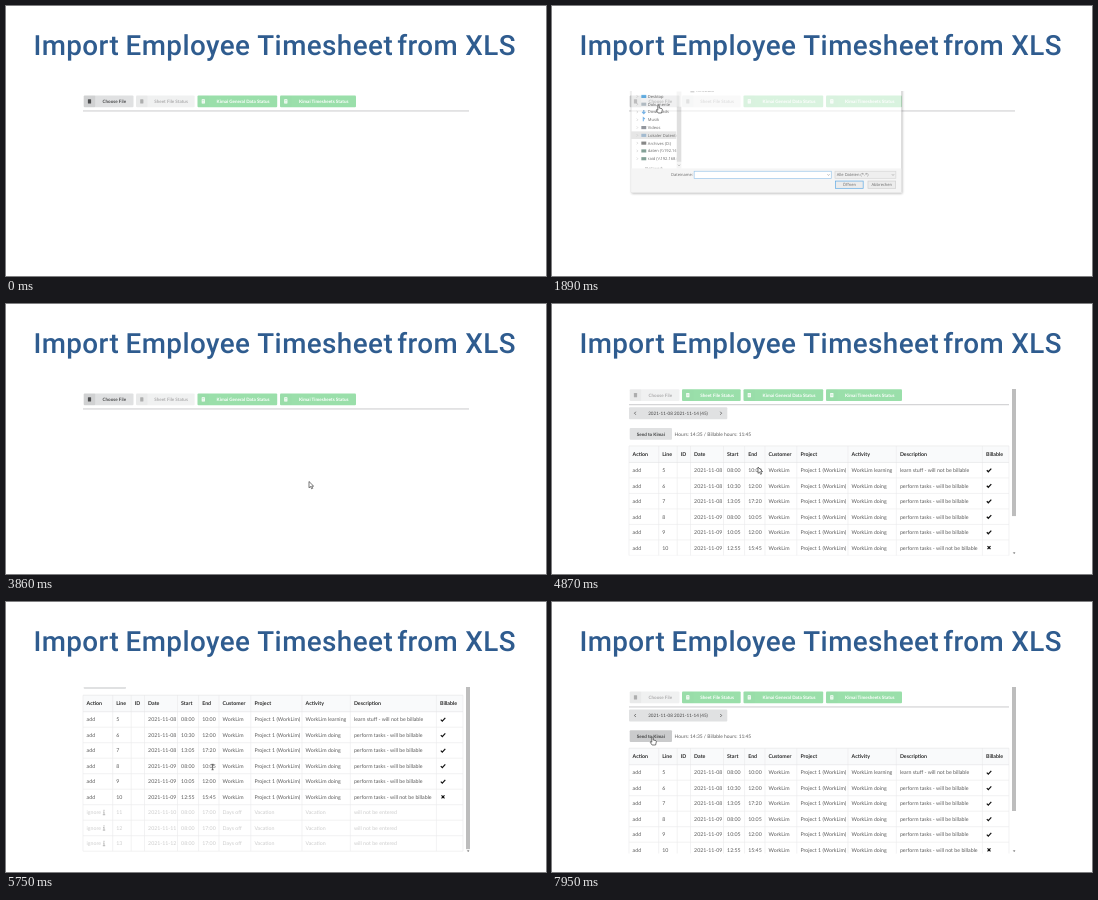
Recreate the animation shown at these times as an HTML page. Size 540 px wide and 270 px high, loop 8000 ms.

```html
<!DOCTYPE html>
<html lang="en">
<head>
<meta charset="utf-8">
<title>Import Employee Timesheet</title>
<style>
  html, body { margin: 0; width: 100%; height: 100%; overflow: hidden; background: #fff; }
  svg { display: block; width: 100vw; height: 100vh; }
  text { white-space: pre; text-rendering: geometricPrecision; }
  .title { font: 500 27.8px Roboto, sans-serif; letter-spacing: .42px; fill: #2f5c8f; }
  .cell { font: 5.25px Lato, sans-serif; fill: #5a5a5a; }
  .head { font: 700 5.25px Lato, sans-serif; fill: #2a2a2a; }
  .week { font-size: 4.6px; fill: #444; text-anchor: middle; }
  .hours { font-size: 4.9px; }
  .button { font: 700 4.55px Lato, sans-serif; text-anchor: middle; }
  .win { font: 4.15px "Open Sans", sans-serif; fill: #111; }
</style>
</head>
<body>
<svg id="stage" viewBox="0 0 540 270" xmlns="http://www.w3.org/2000/svg">
  <defs>
    <clipPath id="view"><rect x="74" y="85" width="391" height="166.5"/></clipPath>
    <clipPath id="side"><rect x="76.5" y="85" width="46.3" height="78.5"/></clipPath>
    <filter id="shadow" x="-10%" y="-10%" width="120%" height="120%">
      <feDropShadow dx="0.8" dy="1" stdDeviation="1.2" flood-opacity=".4"/>
    </filter>
  </defs>
</svg>
<script>
const LOOP = 8000, SCROLL_MAX = 53;
const stage = document.getElementById('stage');

function add(parent, tag, attrs = {}, content) {
  const node = document.createElementNS('http://www.w3.org/2000/svg', tag);
  for (const key in attrs) node.setAttribute(key, attrs[key]);
  if (content !== undefined) node.textContent = content;
  parent.append(node);
  return node;
}
const group = (parent, attrs) => add(parent, 'g', attrs);
const rect = (parent, x, y, width, height, fill, extra) =>
  add(parent, 'rect', { x, y, width, height, fill, ...extra });
const text = (parent, cls, x, y, content, extra) =>
  add(parent, 'text', { class: cls, x, y, ...extra }, content);
const path = (parent, d, stroke, width, extra) =>
  add(parent, 'path', { d, stroke, 'stroke-width': width, fill: 'none', ...extra });
const show = (node, visible) => node.setAttribute('visibility', visible ? 'visible' : 'hidden');
const fade = (node, amount) => node.setAttribute('opacity', amount);

const ramp = (t, from, to) => Math.min(1, Math.max(0, (t - from) / (to - from)));
const ease = u => u * u * (3 - 2 * u);

[['Import', 27.4], ['Employee', 119.6], ['Timesheet', 251.3], ['from', 391.2], ['XLS', 459.2]]
  .forEach(([word, x]) => text(stage, 'title', x, 48.8, word));

const view = group(stage, { 'clip-path': 'url(#view)' });
const page = group(view);

// Labelled button with a darker icon strip on its left
function statusButton(x, width, label, green, opacity) {
  const g = group(page, { opacity });
  const ink = green ? '#fff' : '#4c4d4e';
  const face = rect(g, x, 89.4, width, 11.8, green ? '#21ba45' : '#e0e1e2', { rx: 1 });
  rect(g, x, 89.4, 11.5, 11.8, '#000', { rx: 1, opacity: green ? .03 : .07 });
  rect(g, x + 4.2, 93.2, 3.2, 4.2, ink, { rx: .5 });
  if (green) path(g, `M${x + 4.8} 94.5h2m-2 1.5h2`, '#21ba45', .5);
  text(g, 'button', x + (width + 11.5) / 2, 96.9, label, { fill: ink });
  return { g, face };
}
const choose = statusButton(77.7, 49.8, 'Choose File', false, 1);
const sheetIdle = statusButton(130, 58.7, 'Sheet File Status', false, .45);
const sheetReady = statusButton(130, 58.7, 'Sheet File Status', true, .45);
statusButton(191.5, 79.7, 'Kimai General Data Status', true, .45);
statusButton(274, 76, 'Kimai Timesheets Status', true, .45);
const divider = rect(page, 77, 104.4, 386, 1.1, '#cfcfd1');

// Imported data
const data = group(page);
rect(data, 77, 107.6, 98.3, 12, '#e0e1e2', { rx: 1 });
path(data, 'M83.8 112l-1.3 1.5l1.3 1.5M168.3 112l1.3 1.5l-1.3 1.5', '#444', .7);
text(data, 'cell week', 126, 115.2, '2021-11-08 2021-11-14 (45)');
const send = rect(data, 77.7, 128.2, 42.3, 11.8, '#e0e1e2', { rx: 1 });
text(data, 'button', 98.8, 135.8, 'Send to Kimai', { fill: '#3f4041' });
text(data, 'cell hours', 122.5, 136, 'Hours: 14:35 / Billable hours: 11:45');

const TOP = 146.2, HEAD = 16.5, ROW = 15.5;
const columns = [77, 106.7, 125.2, 138.5, 171.5, 192.6, 213, 244.8, 296, 344.3, 430.4];
const heads = ['Action', 'Line', 'ID', 'Date', 'Start', 'End', 'Customer', 'Project', 'Activity', 'Description', 'Billable'];
const brand = 'WorkLim';
const work = (line, day, start, end, activity, note) =>
  ['add', line, '', '2021-11-' + day, start, end, brand, `Project 1 (${brand})`, `${brand} ${activity}`, note];
const off = (line, day) =>
  ['ignore', line, '', '2021-11-' + day, '08:00', '17:00', 'Days off', 'Vacation', 'Vacation', 'will not be entered'];
const rows = [
  work(5, '08', '08:00', '10:00', 'learning', 'learn stuff - will not be billable'),
  work(6, '08', '10:30', '12:00', 'doing', 'perform tasks - will be billable'),
  work(7, '08', '13:05', '17:20', 'doing', 'perform tasks - will be billable'),
  work(8, '09', '08:00', '10:05', 'doing', 'perform tasks - will be billable'),
  work(9, '09', '10:05', '12:00', 'doing', 'perform tasks - will be billable'),
  work(10, '09', '12:55', '15:45', 'doing', 'perform tasks - will not be billable'),
  off(11, 10), off(12, 11), off(13, 12)
];
const bottom = TOP + HEAD + ROW * rows.length;
rect(data, 77, TOP, 380, HEAD, '#f9fafb');
columns.concat(457).forEach(x => path(data, `M${x} ${TOP}V${bottom}`, '#e9eaeb', .6));
path(data, `M77 ${TOP}H457M77 ${TOP + HEAD}H457`, '#e2e3e4', .6);
heads.forEach((name, i) => text(data, 'head', columns[i] + 3.6, TOP + 10, name));
rows.forEach((row, r) => {
  const mid = TOP + HEAD + ROW * (r + .5);
  const ignored = r > 5;
  const g = group(data, { opacity: ignored ? .3 : 1 });
  path(data, `M77 ${mid + ROW / 2}H457`, '#e9eaeb', .6);
  row.forEach((value, i) => text(g, 'cell', columns[i] + 3.6, mid + 1.9, value));
  if (ignored) path(g, `M98 ${mid - 2.6}v1.2m-1 1h1v2.6m-1.2 0h2.4`, '#333', 1.1);
  else if (r < 5) path(g, `M434.8 ${mid + .1}l1.5 1.5l3-3.2`, '#111', 1.2);
  else path(g, `M435.5 ${mid - 1.5}l3 3m0-3l-3 3`, '#111', 1.2);
});

const scroller = group(view);
const thumb = rect(scroller, 460, 85, 4, 124, '#bdbdbd');
path(scroller, 'M461.3 248.6h1.8l-.9 1.2z', '#777', .4, { fill: '#777' });

// File chooser
const dialog = group(view);
rect(dialog, 76.5, 40, 275.5, 148, '#fff', { filter: 'url(#shadow)', stroke: '#aaa', 'stroke-width': .5 });
const tree = group(dialog, { 'clip-path': 'url(#side)' });
rect(tree, 76.5, 125.6, 46.5, 7.8, '#d9d9d9');
const chevrons = group(tree);
const drives = [['Desktop', '#1e90e0'], ['Dokumente', '#9aa9b5'], ['Downloads'], ['Musik'], ['Videos', '#555b66'],
  ['Lokaler Datenträger', '#6f94b5'], ['Archives (D:)', '#444'],
  ['daten (\\\\192.168.0', '#3c6b5c'], ['raid (\\\\192.168.0.', '#3c6b5c']];
drives.forEach(([name, color], i) => {
  const y = 90 + i * 7.93;
  path(chevrons, `M82.3 ${y - 1.2}l1.1 1.2l-1.1 1.2`, '#999', .5);
  if (color) rect(tree, 87, y - 1.6, 5, 3.2, color);
  else if (name === 'Musik') path(tree, `M89 ${y + 1.5}v-3.7l1.6 1.4`, '#2b88d8', 1.1);
  else path(tree, `M89.5 ${y - 2}v3.5m-1.7-1.6l1.7 1.8l1.7-1.8`, '#2b88d8', 1.2);
  text(tree, 'win', 93.6, y + 1.5, name);
});
text(tree, 'win', 91, 165, 'Netzwerk');
rect(dialog, 123, 85, 4.8, 78.5, '#f0f0f0');
rect(dialog, 123.2, 100.5, 4.4, 56, '#cdcdcd');
path(dialog, 'M124.3 159.5l1.1 1.2l1.1-1.2', '#555', .6);
rect(dialog, 137, 82.5, 4, 3.4, '#bbb');
text(dialog, 'win', 143, 85.5, 'timeData', { opacity: .6 });
rect(dialog, 76.7, 163.3, 275.1, 24.5, '#f0f0f0');
text(dialog, 'win', 139.6, 171.4, 'Dateiname:', { 'text-anchor': 'end' });

function field(x, y, width, height, fill, stroke) {
  return rect(dialog, x, y, width, height, fill, { stroke, 'stroke-width': .7 });
}
field(140.8, 166.2, 139.7, 7.4, '#fff', '#5fa5df');
const fileName = text(dialog, 'win', 142.2, 171.4, brand + '_timeData.xlsx');
field(284.3, 166.2, 62, 7.2, '#e6e6e6', '#c0c0c0');
text(dialog, 'win', 286, 171.4, 'Alle Dateien (*.*)');
path(dialog, 'M276.6 169.3l1.1 1.2l1.1-1.2M342.3 169.3l1.1 1.2l1.1-1.2', '#555', .6);
const open = field(284.8, 176.2, 28.2, 7.4, '#e1e1e1', '#0078d7');
text(dialog, 'win', 298.9, 181.4, 'Öffnen', { 'text-anchor': 'middle' });
field(317.9, 176.2, 28.2, 7.4, '#e1e1e1', '#b5b5b5');
text(dialog, 'win', 332, 181.4, 'Abbrechen', { 'text-anchor': 'middle' });

// Pointer shapes share one moving group
const pointer = group(view);
const solid = { fill: '#fff', 'stroke-linejoin': 'round' };
const arrow = path(pointer, 'M0 0V6.3L1.5 5L2.6 7.3L3.7 6.8L2.7 4.6H4.6Z', '#222', .6, solid);
const hand = path(pointer, 'M-.7 .7Q0-.3 .7 .7V3L3.3 3.6Q4 4 3.8 5L3.1 8H-.4L-2.4 5.2Q-2.2 4.2-.7 5.2Z', '#222', .6, solid);
const beam = path(pointer, 'M0 .3h2.2M1.1 .3v5.4M0 5.7h2.2', '#222', .6);

const route = [
  [250, 420, 252], [1010, 106.5, 99], [1950, 106.5, 99], [2450, 150, 76],
  [2800, 150, 76], [3380, 325, 176], [3580, 303, 177.5], [3860, 303, 177.5],
  [4000, 284, 177.5], [4300, 284, 177.5], [4600, 206, 163.3], [5730, 206, 161.5],
  [6050, 165, 205], [6370, 84, 212], [6950, 84, 212], [7220, 111, 195],
  [7540, 111, 195], [7740, 100.5, 135], [LOOP, 100.5, 135]
];
function pointerAt(t) {
  const i = Math.max(1, route.findIndex(stop => stop[0] >= t));
  const [t0, x0, y0] = route[i - 1], [t1, x1, y1] = route[i];
  const u = ease(ramp(t, t0, t1));
  return [x0 + (x1 - x0) * u, y0 + (y1 - y0) * u];
}
const grey = u => `rgb(${[224, 225, 226].map(c => Math.round(c - 22 * u))})`;

function render(t) {
  const loaded = t >= 3930;
  const scroll = SCROLL_MAX * (ease(ramp(t, 4810, 5160)) - ease(ramp(t, 7215, 7560)));
  page.setAttribute('transform', `translate(0 ${-scroll})`);
  show(data, loaded);
  show(scroller, loaded);
  show(sheetIdle.g, !loaded);
  show(sheetReady.g, loaded);
  divider.setAttribute('width', loaded ? 380 : 386);
  thumb.setAttribute('height', 124 + scroll * .72);

  fade(choose.g, loaded ? .45 : 1);
  choose.face.setAttribute('fill', grey(loaded ? 0 : ramp(t, 1000, 1100) - ramp(t, 1810, 1950)));
  send.setAttribute('fill', grey(ramp(t, 7740, 7880)));

  const opened = ramp(t, 1790, 1950);
  const size = .94 + .06 * ease(opened);
  fade(dialog, t < 3855 ? opened : 0);
  dialog.setAttribute('transform', `translate(214 114) scale(${size}) translate(-214 -114)`);
  fade(chevrons, 1 - .8 * ramp(t, 2900, 3200));
  fade(fileName, +(t >= 2480));
  open.setAttribute('fill', t >= 3640 ? '#cce4f7' : t >= 3480 ? '#e5f1fb' : '#e1e1e1');

  const [x, y] = pointerAt(t);
  const onButton = (t >= 950 && t < 1900) || t >= 7700;
  const onText = t >= 5160 && t < 5850;
  pointer.setAttribute('transform', `translate(${x} ${y})`);
  show(pointer, t >= 260);
  fade(hand, +onButton);
  fade(beam, +onText);
  fade(arrow, +!(onButton || onText));
}

const begin = performance.now();
function frame() {
  render((performance.now() - begin) % LOOP);
  requestAnimationFrame(frame);
}
frame();
</script>
</body>
</html>
```
